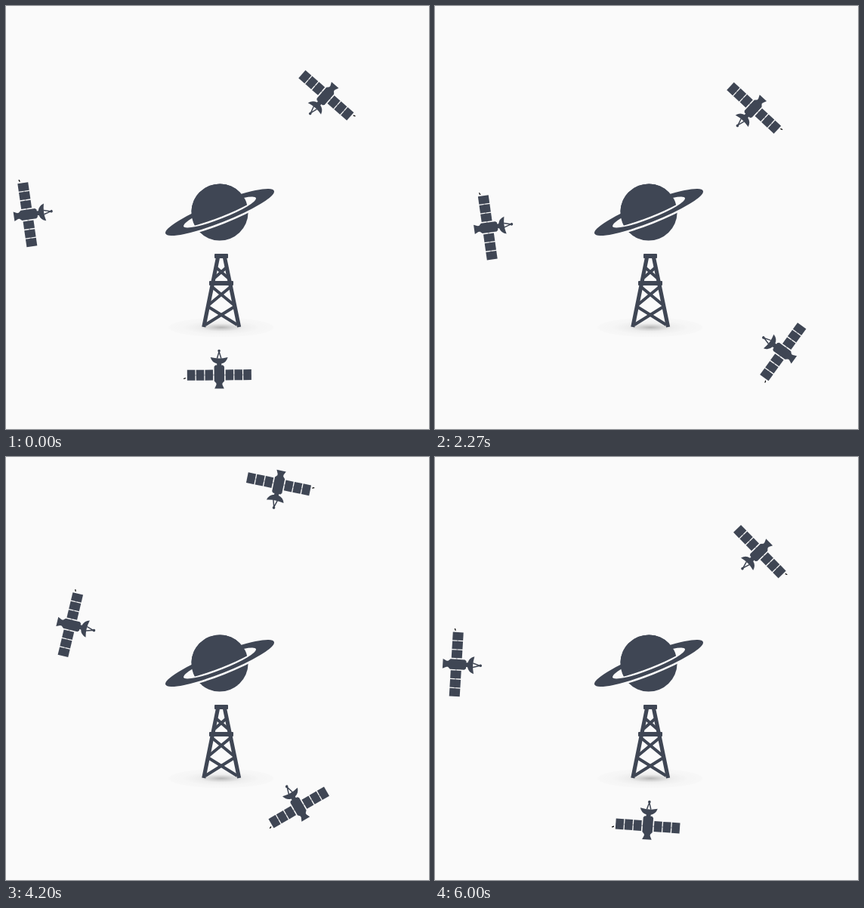
Write an HTML page that moves like this. It is 560 px wide and 560 px high and loops after 6070 ms.

```html
<!DOCTYPE html>
<html lang="en">
<head>
<meta charset="utf-8">
<title>Satellites</title>
<style>
  html, body { margin: 0; height: 100%; overflow: hidden; background: #fafafa; }
  svg { display: block; width: 100vw; height: 100vh; }
  .ink { fill: #3f4654; }
  .line { fill: none; stroke: #3f4654; }
  .paper { fill: #fafafa; }
</style>
</head>
<body>
<svg viewBox="0 0 560 560">
  <defs>
    <radialGradient id="shade">
      <stop offset="0" stop-opacity=".27"/>
      <stop offset=".18" stop-opacity=".16"/>
      <stop offset=".4" stop-opacity=".05"/>
      <stop offset=".7" stop-opacity=".018"/>
      <stop offset=".95" stop-opacity=".012"/>
      <stop offset="1" stop-opacity="0"/>
    </radialGradient>
    <clipPath id="back"><path d="M-60 -60H60V0H52A52 6.2 0 0 1 -52 0H-60Z"/></clipPath>
    <g id="wing">
      <rect x="8.3" y="2" width="10.5" height="14"/>
      <rect x="20.1" y="2" width="10.5" height="14"/>
      <rect x="31.9" y="2" width="10.6" height="14"/>
      <rect x="6" y="8" width="36" height="2" opacity=".35"/>
    </g>
    <g id="sat" class="ink">
      <use href="#wing"/>
      <use href="#wing" transform="scale(-1 1)"/>
      <path d="M-5 -4H5L6.7 -2V17L4 20V22L6.3 27H-6.3L-4 22V20L-6.7 17V-2Z"/>
      <path d="M-11.5 -14.5Q0 -11.5 11.500 -14.5Q9.5 -7.5 3 -6V-3H-3V-6Q-9.5 -7.5 -11.5 -14.5Z"/>
      <path class="line" d="M-2.7 -13L0 -22L2.7 -13" stroke-width="1.5"/>
      <circle cy="-23" r="1.8"/>
      <path d="M-47.5 13.2L-44.5 12V13.4L-47 14.2Z" fill="#000"/>
    </g>
  </defs>

  <rect class="paper" width="560" height="560"/>

  <g transform="translate(283 273) rotate(-21.5)">
    <circle class="ink" r="37.6"/>
    <ellipse rx="77.2" ry="13.5" class="ink" stroke="#fafafa" stroke-width="5" paint-order="stroke"/>
    <ellipse class="paper" rx="51.5" ry="8.7"/>
    <circle class="ink" r="37.6" clip-path="url(#back)"/>
  </g>

  <ellipse cx="285" cy="425.5" rx="71" ry="13" fill="url(#shade)"/>
  <g class="line" stroke-width="4">
    <path d="M280.500 333L261.800 425M289.500 333L308.600 425" stroke-width="5.200"/>
    <path d="M278 346L294 360M292 346L276 360"/>
    <path d="M273 372L302 396M297 372L268 396"/>
    <path d="M267.500 398L306 422M302.500 398L264 422"/>
  </g>
  <g class="ink">
    <rect x="276" y="328" width="18" height="6" rx="1"/>
    <rect x="269" y="364" width="32" height="6" rx="1"/>
  </g>

  <use class="sat" href="#sat"/>
  <use class="sat" href="#sat"/>
  <use class="sat" href="#sat"/>
</svg>
<script>
  const LOOP = 6070, STEP = 1 / 15, LAST = 90;
  // Seconds at which each satellite's tilt is pinned
  const keys = [0, 1, 2.267, 3.4, 4.2, 5.267, 6];
  // Orbit centre and radii, start angle, degrees per second,
  // sideways offset of the tilt pivot, tilt at each key
  const orbits = [
    { x: 280.9, y: 283.5, rx: 196, ry: 196, start: -0.4, speed: 60, pivot: 0,
      tilt: [-0.1, -4.9, -0.8, -0.2, -4.1, -1.5, 4.4] },
    { x: 280.7, y: 278.4, rx: 243.5, ry: 247, start: 90.8, speed: 60, pivot: 0,
      tilt: [-9, -7.9, -8.9, -5.4, -7.2, -9, 2.6] },
    { x: 284, y: 278, rx: 203.3, ry: 203.3, start: 221.2, speed: 59.6, pivot: 34,
      tilt: [0, -6.6, -4.2, -9.7, -1, -8.1, 1.9] }
  ];
  const sats = document.querySelectorAll('.sat');

  function sway(tilt, t) {
    let i = 0;
    while (i < keys.length - 2 && t >= keys[i + 1]) i++;
    const p = (t - keys[i]) / (keys[i + 1] - keys[i]);
    return tilt[i] + (tilt[i + 1] - tilt[i]) * (1 - Math.cos(Math.PI * p)) / 2;
  }

  function draw(now) {
    const ms = now % LOOP;
    const t = Math.min(LAST, Math.floor(ms / 1000 / STEP + 0.1)) * STEP;
    orbits.forEach((o, i) => {
      const angle = o.start - o.speed * t;
      const rad = angle * Math.PI / 180;
      const x = o.x - o.rx * Math.sin(rad);
      const y = o.y + o.ry * Math.cos(rad);
      sats[i].setAttribute('transform',
        `translate(${x} ${y}) rotate(${angle}) rotate(${sway(o.tilt, t)} ${o.pivot} 0)`);
    });
    requestAnimationFrame(draw);
  }
  draw(performance.now());
</script>
</body>
</html>
```
